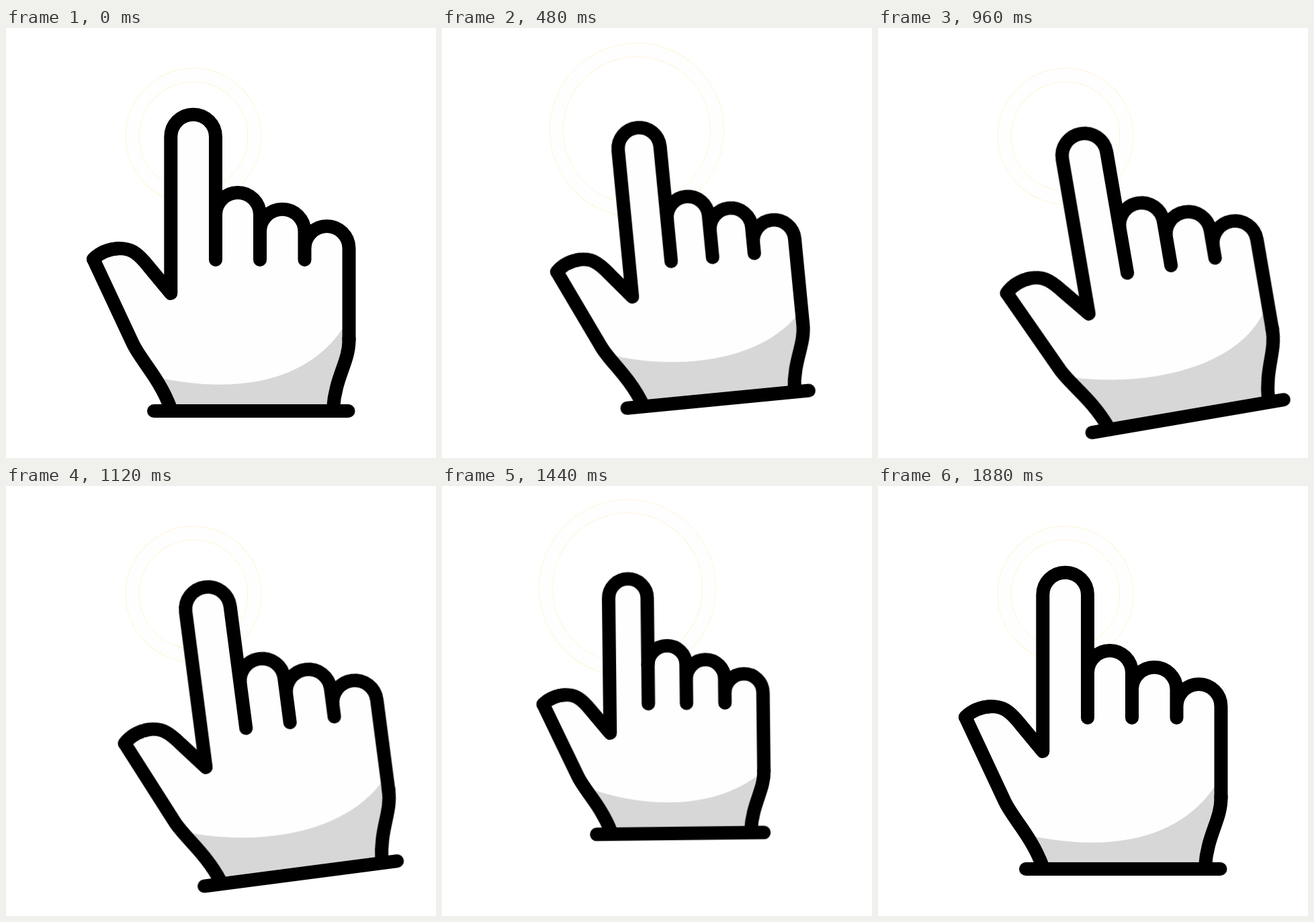
Recreate the animation shown at these times as an HTML page without scripts. Size 640 by 640 pixels, loop 2 s.

```html
<!DOCTYPE html>
<html lang="en">
<head>
<meta charset="utf-8">
<title>Tapping hand</title>
<style>
  html, body { margin: 0; width: 100%; height: 100%; overflow: hidden; background: #fff; }
  svg { display: block; width: 100%; height: 100%; }
  path, circle { vector-effect: non-scaling-stroke; }

  .swing, .press, .ring, .shade { animation: 2s infinite ease-in-out; }
  .swing { animation-name: swing; transform-origin: 278px 162px; }
  .press { animation-name: press; transform-origin: 251px 184px; }
  .ring { animation-name: ring; fill: none; }
  .shade { animation-name: shade; animation-timing-function: linear; fill: #d6d7d6; }

  .edge { stroke: #ffecb8; stroke-width: 20.8; }
  .band { stroke: #fefefe; stroke-width: 19.8; }
  .skin { fill: #fefefe; }
  .line { fill: none; stroke: #000; stroke-width: 20; stroke-linecap: round; stroke-linejoin: round; }
  .cuff { stroke-linecap: butt; }

  @keyframes swing {
    0%, 6%, 78.1%, 100% { transform: translate(0, 0) rotate(0deg); }
    40%, 44.1% { transform: translate(29.5px, 29px) rotate(-10deg); }
  }
  @keyframes press {
    0%, 6%, 32%, 60%, 87%, 100% { transform: scale(1); }
    14%, 68% { transform: scale(.846); }
  }
  /* The second pulse grows from a point further right. */
  @keyframes ring {
    0%, 14%, 45% { transform: scale(1); transform-origin: 244.5px 189.5px; }
    26.5% { transform: scale(1.34); transform-origin: 244.5px 189.5px; }
    60%, 91.5%, 100% { transform: scale(1); transform-origin: 288px 188.5px; }
    73% { transform: scale(1.34); transform-origin: 288px 188.5px; }
  }
  @keyframes shade {
    0%, 6%, 88%, 100% { d: path("M225 520C330 543 448 534 505 441V570H205Z"); }
    16% { d: path("M205 482C290 513 420 524 505 459V570H205Z"); }
    32% { d: path("M205 486C300 517 446 519 506 434V570H205Z"); }
    40%, 48% { d: path("M205 484C300 514 450 518 506 431V570H205Z"); }
    64% { d: path("M205 490C290 522 420 533 505 462V570H205Z"); }
    72% { d: path("M205 489C290 522 420 535 505 467V570H205Z"); }
  }
</style>
</head>
<body>
<svg viewBox="0 0 640 640">
  <defs>
    <path id="body" d="M245 395L213 356C195 333 185 328 168 328C152 329 139 335 130 344L188 468C199 493 228 520 245 566H487C490 520 510.500 497 510.500 465V328A33 33 0 0 0 444.500 328V303A33 33 0 0 0 378 303V278A33 33 0 0 0 312 278V162A33.300 33.300 0 0 0 245.300 162Z"/>
    <clipPath id="inside"><use href="#body"/></clipPath>
  </defs>

  <g class="ring">
    <circle class="edge" cx="279" cy="161" r="91"/>
    <circle class="band" cx="279" cy="161" r="91"/>
  </g>

  <g class="swing">
    <g class="press">
      <use class="skin" href="#body"/>
      <g clip-path="url(#inside)">
        <path class="shade" d="M225 520C330 543 448 534 505 441V570H205Z"/>
      </g>
      <!-- index finger and thumb -->
      <path class="line" d="M312 345V162A33.300 33.300 0 0 0 245.300 162V395L213 356C195 333 185 328 168 328C152 329 139 335 130 344"/>
      <!-- folded fingers -->
      <path class="line" d="M312 278A33 33 0 0 1 378 278V345M378 303A33 33 0 0 1 444.500 303V345M444.500 328A33 33 0 0 1 510.500 328V465"/>
      <!-- wrist -->
      <path class="line cuff" d="M168 328C152 329 139 335 130 344L188 468C199 493 228 520 245 566M510.500 460V465C510.500 497 490 520 487 566"/>
      <path class="line" d="M220 570H509.500"/>
    </g>
  </g>
</svg>
</body>
</html>
```
